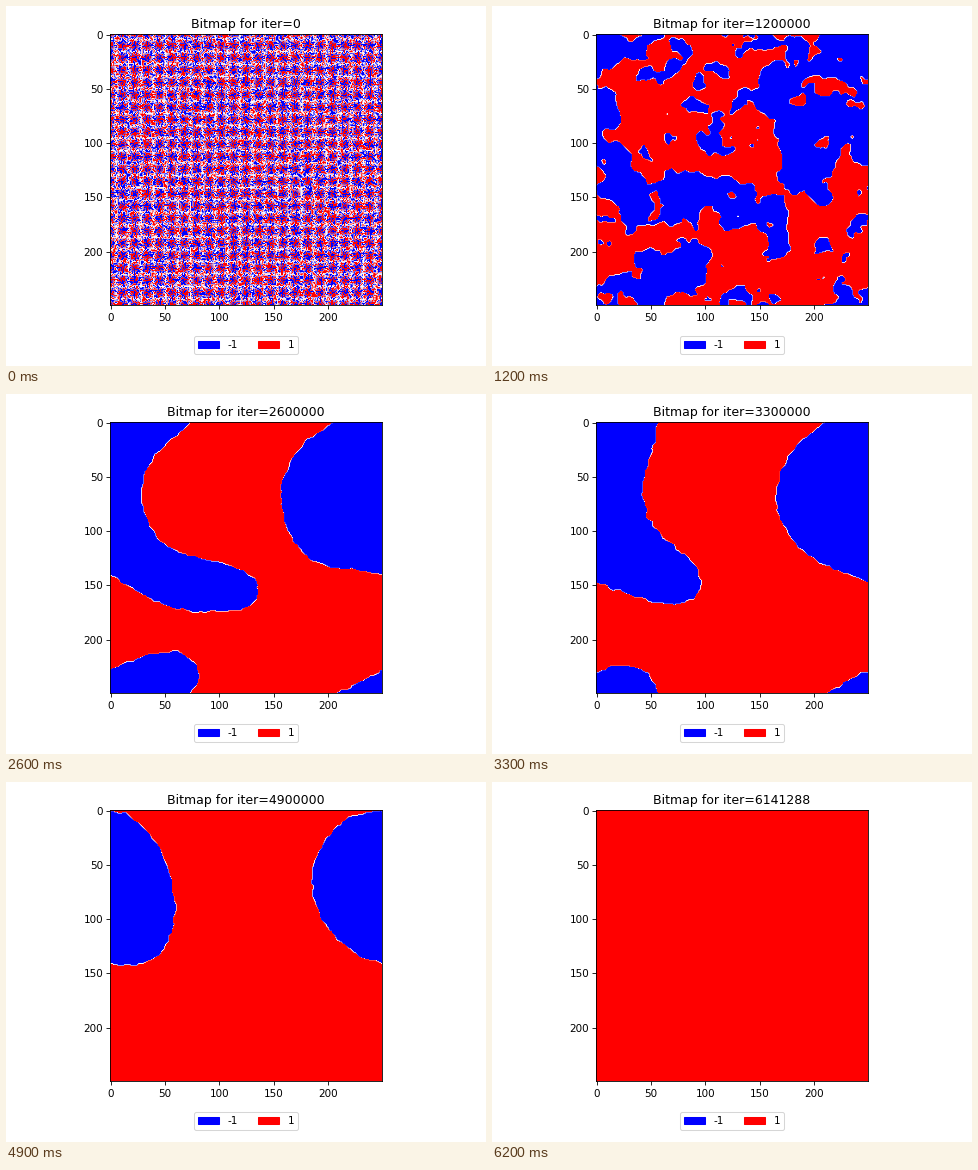
Write a matplotlib script that moves like this. It is 480 px wide and 360 px high and loops after 6.3 s.

```python
from itertools import product

import numpy as np
import matplotlib.pyplot as plt
from matplotlib.animation import FuncAnimation
from matplotlib.patches import Patch
from matplotlib.path import Path

N = 250                      # cells per side, edges wrap around
FRAMES = 63
STEP = 100_000
LAST_ITER = 6_141_288
END = LAST_ITER / STEP
SETTLED = 19                 # from here on the domains only shrink

W, H, DPI = 480, 360, 75

yy, xx = np.mgrid[:N, :N]
CELLS = np.column_stack([xx.ravel(), yy.ravel()])
FREQ2 = np.fft.fftfreq(N)[:, None] ** 2 + np.fft.fftfreq(N)[None, :] ** 2

# Corners of the settled blue domain; x beyond N and y below 0 wrap around.
DOMAIN = [(213, 0), (250, -25), (290, -24), (292, -43), (330, -52), (353, -48),
          (358, -15), (355, 0), (313, 0), (300, 15), (265, 26), (264, 36),
          (270, 90), (282, 125), (306, 138), (340, 126), (360, 126), (400, 148),
          (421, 155), (429, 195), (413, 212), (405, 190), (390, 168), (364, 164),
          (320, 178), (290, 178), (272, 151), (250, 122), (230, 105), (210, 105),
          (219, 150), (209, 161), (183, 151), (166, 103), (145, 52), (150, 32),
          (185, 17)]
GAP = [(186, 46), (190, 37), (218, 37), (245, 55), (245, 70), (205, 56)]


def inside(corners):
    path = Path(corners)
    hits = [path.contains_points(CELLS + shift)
            for shift in product((-N, 0, N), repeat=2)]
    return np.any(hits, axis=0).reshape(N, N)


def smooth(field, sigma):
    """Periodic Gaussian blur."""
    kernel = np.exp(-2 * np.pi ** 2 * sigma ** 2 * FREQ2)
    return np.fft.ifft2(np.fft.fft2(field) * kernel).real


def texture(noise, sigma):
    """Blurred noise scaled to unit deviation."""
    out = smooth(noise, sigma)
    return out / out.std()


def shrink(mask, substeps=3, sigma=8):
    """Curvature flow by blur and threshold, one mask per frame."""
    times = [SETTLED, 26, 49, END]
    areas = [mask.sum(), 24500, 13760, 0]
    masks = [mask]
    for f in range(SETTLED, int(END)):
        for k in range(1, substeps + 1):
            soft = smooth(mask, sigma)
            area = np.interp(f + k / substeps, times, areas)
            mask = soft > np.quantile(soft, 1 - area / N ** 2)
        masks.append(mask)
    return masks


NOISE = np.random.default_rng(5).standard_normal((N, N))
ISLAND = np.hypot((xx - 111) / 21, (yy - 97) / 15) < 1
MASKS = shrink(inside(DOMAIN) & ~inside(GAP) | ISLAND)


def level(f):
    """Positive where blue: random domains merge, then shrink."""
    shape = 15 * (smooth(MASKS[max(0, f - SETTLED)], 3) - 0.5)
    if f >= SETTLED:
        return shape
    u = (f / SETTLED) ** 1.5
    sigma = 1.6 * np.sqrt(f)
    return (1 - u) * 1.3 * sigma * texture(NOISE, sigma) + u * shape


def spins(f):
    if f >= END:
        return np.ones((N, N))
    if f == 0:
        return np.where(NOISE > 0, -1, 1)
    rough = texture(np.random.default_rng(f).standard_normal((N, N)), 2.2)
    return np.where(level(f) + 1.2 * rough > 0, -1, 1)


fig = plt.figure(figsize=(W / DPI, H / DPI), dpi=DPI)
ax = fig.add_axes([104.4 / W, 60.6 / H, 271.3 / W, 271.3 / H])
image = ax.imshow(spins(0), cmap="bwr", vmin=-1, vmax=1)
title = ax.set_title("Bitmap for iter=0")
ax.legend(handles=[Patch(color="blue", label="-1"), Patch(color="red", label="1")],
          loc="lower center", bbox_to_anchor=(0.5, -0.2), ncol=2)


def update(f):
    image.set_data(spins(f))
    title.set_text(f"Bitmap for iter={min(f * STEP, LAST_ITER)}")
    return image, title


anim = FuncAnimation(fig, update, frames=FRAMES, interval=100, repeat=True)
plt.show()
```
